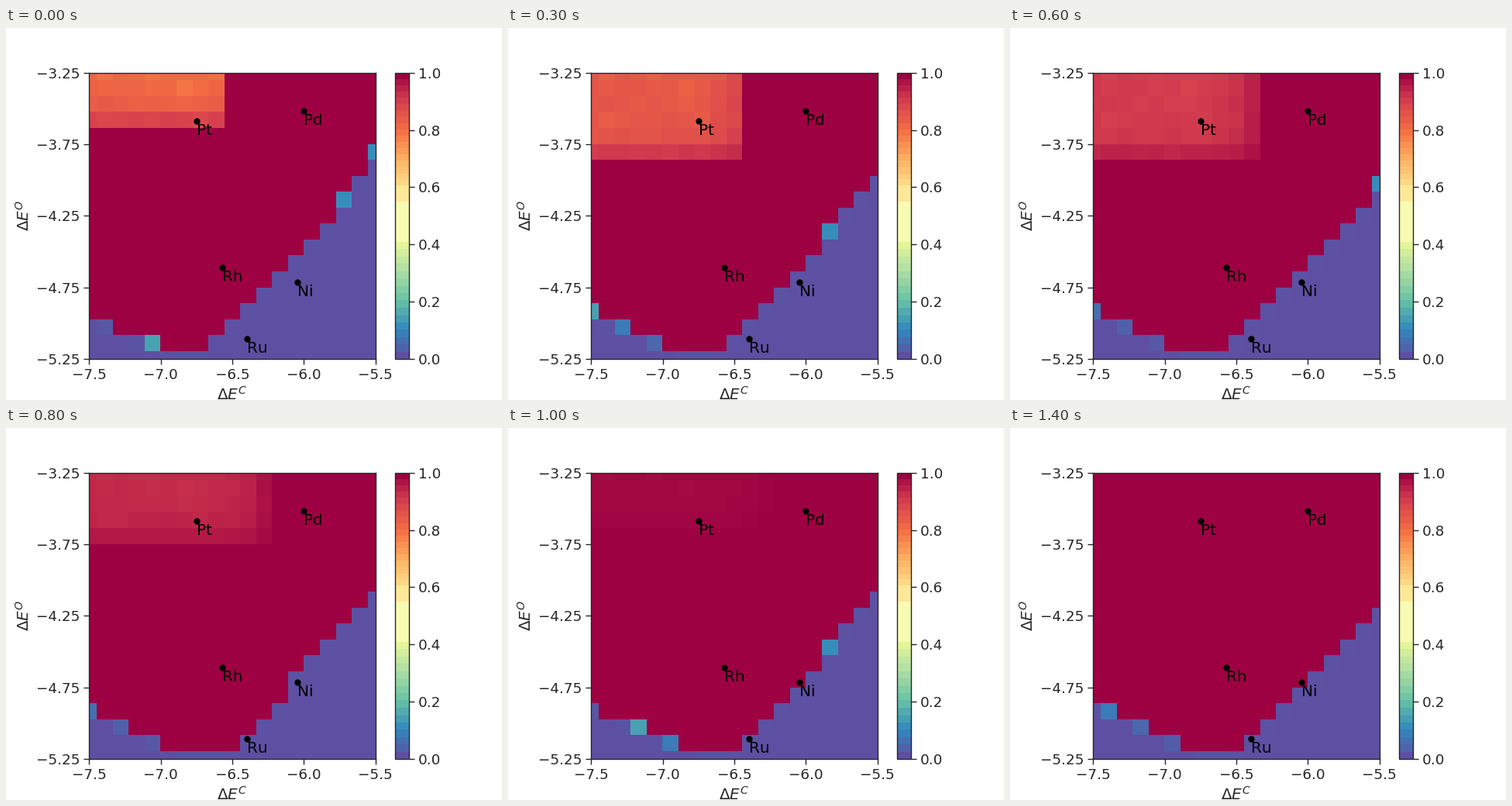
Write a matplotlib script that moves like this. It is 640x480 px and loops after 1500 ms.

```python
import numpy as np
import matplotlib.pyplot as plt
from matplotlib.animation import FuncAnimation
from matplotlib.cm import ScalarMappable
from matplotlib.colors import ListedColormap

N = 19        # grid points per axis
FRAMES = 15
DARK = "0.15"

plt.rcParams.update({
    "font.family": "DejaVu Sans",
    "font.size": 14.4,
    "text.kerning_factor": 6,
    "axes.labelsize": 14.4,
    "axes.linewidth": 1.0,
    "axes.edgecolor": DARK,
    "axes.labelcolor": DARK,
    "mathtext.fontset": "dejavusans",
})
for axis in ("xtick", "ytick"):
    plt.rcParams.update({
        f"{axis}.labelsize": 13.2,
        f"{axis}.major.size": 4.8,
        f"{axis}.major.width": 1.0,
        f"{axis}.color": DARK,
    })

rows, cols = np.mgrid[:N, :N]
noise = np.random.default_rng(3).normal(0, .04, (N, N))


def warm_region(t):
    """Coverage in the upper left, rising to 1 while its edges drift."""
    base = np.interp(t, [0, 3, 6, 8, 10, 12], [.805, .84, .9, .93, .985, 1])
    right = min(int(8 + .4 * t), 11)
    bottom = round(np.interp(t, [0, 1, 3, 6, 8, 10], [15, 14, 13, 13, 14, 15]))
    low_rim = .42 * np.exp(-1.3 * (rows - bottom))
    side_rim = min(.08 * t, .6) * np.exp(cols - right)
    value = 1 - (1 - base) * (1 - low_rim) * (1 - side_rim) * (1 + noise)
    inside = (cols <= right) & (rows >= bottom)
    return np.where(inside, value, 1)


def bare_level(t):
    """Height of the zero-coverage area in every column."""
    c = np.arange(N)
    left = np.interp(t, [0, 1, 3, 6, 8, 10, 12, 14],
                     [3.85, 3.87, 4.05, 4.2, 4.2, 4.4, 4.42, 4.6]) - .45 * c
    # Each front lowers the staircase by one row as it moves to the right.
    fronts = (
        17.5 + t,
        15.5 + t,
        np.interp(t, [0, 1, 3, 8], [7, 12, 14.5, 19.5]),
        np.interp(t, [6, 8, 10, 12], [7, 12, 14.5, 18.5]),
    )
    right = c - 7.4 + sum(np.clip(c - front, 0, 1) for front in fronts)
    return np.maximum(np.maximum(left, right), 1.5)


def grid_at(t):
    depth = bare_level(t) - rows - 1
    # Cells that were uncovered only just now keep a little coverage.
    residue = .2 * np.exp(-6 * np.maximum(depth, 0))
    return np.where(depth >= 0, residue, warm_region(t))


def banded(cmap, edges, size=1024):
    """Colour map with one flat colour between neighbouring edges."""
    x = (np.arange(size) + .5) / size
    band = np.searchsorted(edges, x) - 1
    tone = edges[:-1] + .4 * np.diff(edges)
    tone[0], tone[-1] = 0, 1
    return ListedColormap(cmap(tone[band]))


fig, ax = plt.subplots(figsize=(6.4, 4.8), dpi=100)
fig.patch.set_facecolor("white")
spectral = plt.get_cmap("Spectral_r")

half = 1 / (N - 1)
image = ax.imshow(
    grid_at(0), cmap=spectral, vmin=0, vmax=1, origin="lower",
    interpolation="nearest",
    extent=(-7.5 - half, -5.5 + half, -5.25 - half, -3.25 + half))
ax.set(xlim=(-7.5, -5.5), ylim=(-5.25, -3.25),
       xticks=np.arange(-7.5, -5.4, .5), yticks=np.arange(-5.25, -3.2, .5),
       xlabel=r"$\Delta E^C$", ylabel=r"$\Delta E^O$")
ax.xaxis.set_major_formatter("{x:.1f}")
ax.yaxis.set_major_formatter("{x:.2f}")

edges = np.r_[np.linspace(0, .41, 17), .55, np.linspace(.605, 1, 19)]
bar = fig.colorbar(ScalarMappable(cmap=banded(spectral, edges)), ax=ax,
                   ticks=np.linspace(0, 1, 6))
bar.ax.yaxis.set_major_formatter("{x:.1f}")

METALS = {
    "Pt": (-6.75, -3.59),
    "Pd": (-6.0, -3.52),
    "Rh": (-6.57, -4.61),
    "Ni": (-6.045, -4.715),
    "Ru": (-6.395, -5.11),
}
for name, point in METALS.items():
    ax.plot(*point, "o", color="black", ms=6, mew=0)
    ax.annotate(name, point, xytext=(0, -18), textcoords="offset pixels",
                color="black", ha="left", va="baseline")


def update(i):
    image.set_data(grid_at(i))
    return [image]


anim = FuncAnimation(fig, update, frames=FRAMES, interval=100,
                     repeat=True, repeat_delay=0)
plt.show()
```
